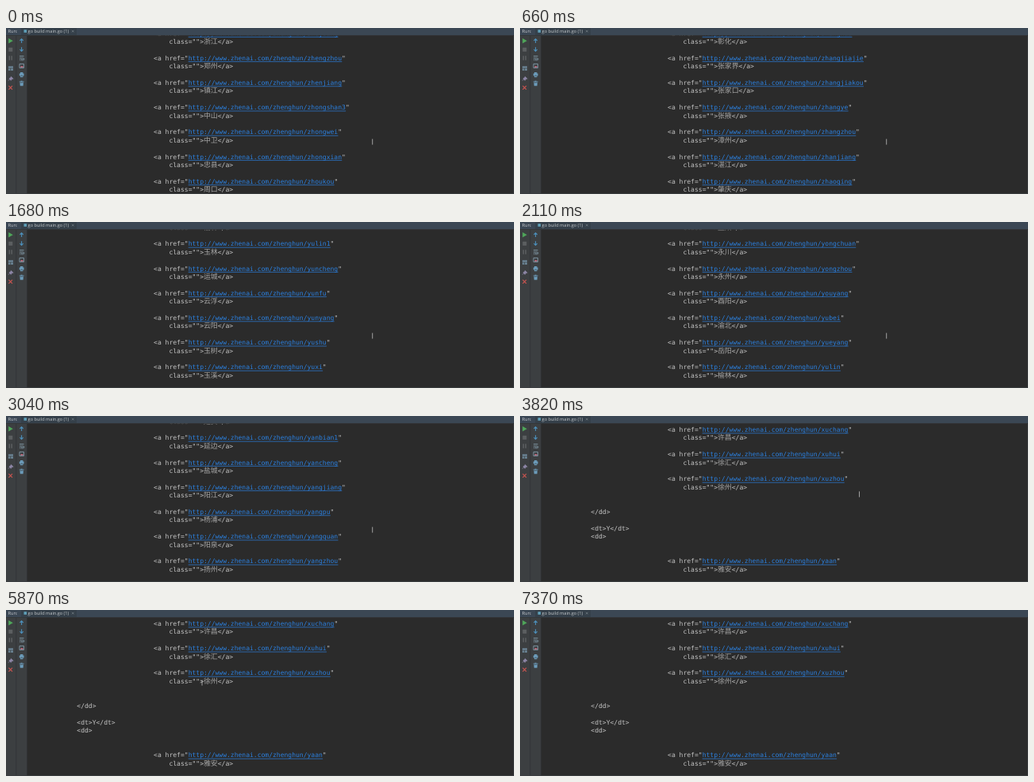
These frames come from a looping animation (640 px wide and 210 px high, 7620 ms). An HTML page:

```html
<!DOCTYPE html>
<html lang="en">
<head>
<meta charset="utf-8">
<title>Console output</title>
<style>
  html, body { margin: 0; width: 100%; height: 100%; overflow: hidden; background: #2b2b2b; }
  svg { display: block; width: 100vw; height: 100vh; }
  text { text-rendering: geometricPrecision; }
  .code { font: 8.04px "DejaVu Sans Mono", "Noto Sans Mono", monospace; fill: #c4c4c4; }
  .link { fill: #2b80e0; }
  .han { font: 8.9px "Noto Sans CJK SC", "Noto Sans CJK", sans-serif; fill: #a6a6a6; }
  .ui { font: 5.6px "Open Sans", "Noto Sans", sans-serif; fill: #c3c7ca; }
</style>
</head>
<body>
<svg viewBox="0 0 640 210">
  <rect width="640" height="210" fill="#2b2b2b"/>
  <g id="log"></g>

  <!-- tool window header -->
  <rect width="640" height="9.5" fill="#3b4754"/>
  <rect x="19" width="70" height="9.5" fill="#35404a"/>
  <rect y="9" width="640" height=".7" fill="#323232"/>
  <text class="ui" x="2.5" y="6.2">Run:</text>
  <rect x="22.5" y="2.2" width="3.6" height="3.6" fill="#5f9fb8"/>
  <text class="ui" x="27.6" y="6.2">go build main.go (1)</text>
  <path d="M83 2.8l2.6 2.6m0-2.6l-2.6 2.6" stroke="#8a9299" stroke-width=".6"/>

  <!-- side toolbars -->
  <rect y="9.7" width="26.5" height="200.3" fill="#3c3f41"/>
  <path d="M12.8 10V210M26.5 10V210" stroke="#313335" stroke-width=".7"/>
  <path d="M3.2 13v6.4l5.6-3.2z" fill="#4fa65a"/>
  <rect x="3.3" y="24.8" width="5" height="5" fill="#5c5f61"/>
  <path d="M4.3 35.3v5.4M7.2 35.3v5.4" stroke="#5c5f61" stroke-width="1.5"/>
  <path d="M3 48.4h6v5.4H3z" fill="#6d8799"/>
  <path d="M3 51h6M5.6 51v2.8" stroke="#3c3f41" stroke-width=".7"/>
  <path d="M6.4 61.4l2.8 2.8-1.6.4-1.4 1.8-2.4-2.4 2-1.2zM4.6 65l-1.8 2" fill="#8d86a6" stroke="#8d86a6" stroke-width=".6"/>
  <path d="M3.4 73.2l4.6 4.6m0-4.6l-4.6 4.6" stroke="#c75450" stroke-width="1.2"/>
  <g fill="none" stroke="#8299a8" stroke-width=".9">
    <path d="M17 35.6h5.5M17 38h4.5q1.8 0 1.2 2.2h-3M17 40.2h1.5M20.3 39.2l-1 1 1 1"/>
    <path d="M17 45.5h5.5v5H17z"/>
  </g>
  <path d="M18.5 48h3v2h-3z" fill="#b26a7c"/>
  <g fill="#6b9ab8">
    <path d="M18 56h3.4v1.4h1.2v3.2h-1.2v1.6H18v-1.6h-1.2v-3.2H18z"/>
    <path d="M18.6 66.8h2v.8h2v1h-5.8v-1h1.8zM17.4 69.2h4.6l-.4 4h-3.8z"/>
  </g>
  <path d="M18.6 60.4h2.2" stroke="#3c3f41" stroke-width=".7"/>
  <g fill="none" stroke="#4d91bd" stroke-width="1.1">
    <path d="M19.6 19v-5.2M17.5 16l2.1-2.2 2.1 2.2"/>
    <path d="M19.6 24.2v5.2M17.5 27.2l2.1 2.2 2.1-2.2"/>
  </g>

  <path d="M0 209.5H640M639.6 10V210" stroke="#3c3f41" stroke-width=".9"/>
  <path id="beam" d="M0-3.6V3.6" stroke="#c0c0c0" stroke-width=".8"/>
</svg>
<script>
const LOOP = 7620, STEP = 120, HIDE = 7370;
const LINE = 10.4, CHAR = 4.84, NOTCH = 3 * LINE;
const TOP = 17.4, LEFT = 89.3, INDENT = LEFT + 20 * CHAR;
const log = document.getElementById('log');
const beam = document.getElementById('beam');

const groups = {
  X: 'xuchang许昌 xuhui徐汇 xuzhou徐州',
  Y: 'yaan雅安 yanan延安 yanbian1延边 yancheng盐城 yangjiang阳江 yangpu杨浦 yangquan阳泉 ' +
     'yangzhou扬州 yanqing延庆 yantai烟台 yibin宜宾 yichang宜昌 yichun宜春 yili伊犁 ' +
     'yinchuan银川 yingkou营口 yingtan鹰潭 yiyang益阳 yongchuan永川 yongzhou永州 ' +
     'youyang酉阳 yubei渝北 yueyang岳阳 yulin榆林 yulin1玉林 yuncheng运城 yunfu云浮 ' +
     'yunyang云阳 yushu玉树 yuxi玉溪 yuzhong1渝中',
  Z: 'zaozhuang枣庄 zhabei闸北 zhanghua彰化 zhangjiajie张家界 zhangjiakou张家口 ' +
     'zhangye张掖 zhangzhou漳州 zhanjiang湛江 zhaoqing肇庆 zhaotong昭通 zhejiang浙江 ' +
     'zhengzhou郑州 zhenjiang镇江 zhongshan3中山 zhongwei中卫 zhongxian忠县 zhoukou周口'
};

function add(parent, tag, attrs, text) {
  const el = document.createElementNS('http://www.w3.org/2000/svg', tag);
  for (const key in attrs) el.setAttribute(key, attrs[key]);
  if (text) el.textContent = text;
  return parent.appendChild(el);
}

const baseline = row => row * LINE + 2.6;

function print(row, x, text) {
  return add(log, 'text', { class: 'code', x, y: baseline(row) }, text);
}

function printCity(row, slug, name) {
  const url = 'http://www.zhenai.com/zhenghun/' + slug;
  const start = INDENT + 9 * CHAR, end = start + url.length * CHAR;
  const link = print(row, INDENT, '<a href="');
  add(link, 'tspan', { class: 'link' }, url);
  add(link, 'tspan', {}, '"');
  add(log, 'path', {
    d: `M${start} ${baseline(row) + 1.8}H${end}`, stroke: '#2b80e0', 'stroke-width': .7
  });
  const label = print(row + 1, INDENT + 4 * CHAR, 'class="">');
  add(label, 'tspan', { class: 'han' }, name);
  add(label, 'tspan', {}, '</a>');
}

let row = 0;
for (const letter in groups) {
  if (row) {
    print(row + 1, LEFT, '</dd>');
    print(row + 3, LEFT, `<dt>${letter}</dt>`);
    print(row + 4, LEFT, '<dd>');
    row += 7;
  }
  for (const city of groups[letter].split(' ')) {
    const [, slug, name] = city.match(/^(\w+)(.+)$/);
    printCity(row, slug, name);
    row += 3;
  }
}

// steps done at time t in a burst of evenly spaced steps
const stepsDone = (t, start, count) =>
  Math.max(0, Math.min(count, Math.floor((t - start) / STEP) + 1));

// wheel bursts: start, steps; later bursts turn more notches per step
const wheel = [
  [270, 3], [660, 2], [1090, 2], [1370, 1], [1680, 1],
  [1960, 2], [2390, 1], [2670, 1], [2920, 2], [3200, 2]
];
const TOTAL = 49;

function notches(t) {
  const turned = wheel.reduce((sum, [start, count]) =>
    sum + stepsDone(t, start, count) * (2 + Math.floor(start / 1180)), 0);
  return Math.min(TOTAL, turned);
}

// pointer moves: start, steps, destination
const moves = [
  [3460, 4, 427.5, 99], [3980, 5, 407, 79], [4660, 3, 376, 80], [5360, 2, 277, 93],
  [5630, 3, 247, 92], [5990, 1, 412, 79], [6110, 1, 277, 94], [6390, 1, 306, 96],
  [6540, 2, 149, 103], [6970, 3, 512, 158.5]
];

function pointerAt(t) {
  let x = 461.7, y = 144;
  for (const [start, count, toX, toY] of moves) {
    const part = stepsDone(t, start, count) / count;
    x += (toX - x) * part;
    y += (toY - y) * part;
  }
  return [x, y];
}

function draw(t) {
  log.setAttribute('transform', `translate(0 ${TOP - (TOTAL - notches(t)) * NOTCH})`);
  beam.setAttribute('transform', `translate(${pointerAt(t)})`);
  beam.setAttribute('visibility', t < HIDE ? 'visible' : 'hidden');
}

const began = performance.now();
function tick() {
  draw((performance.now() - began) % LOOP);
  requestAnimationFrame(tick);
}
tick();
</script>
</body>
</html>
```
